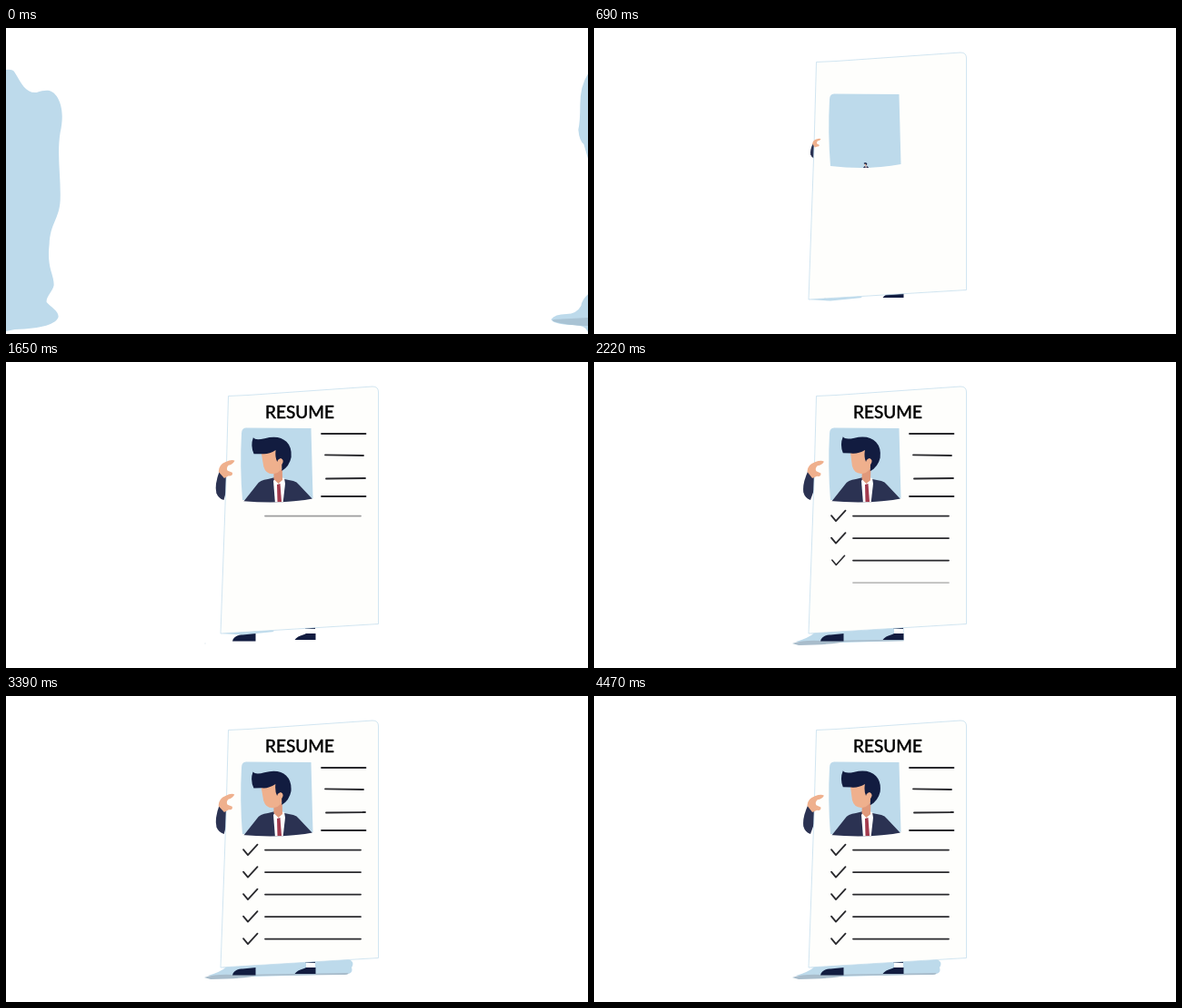
Animation of 640 by 337 pixels, one loop 4500 ms. Source, as an HTML page:

```html
<!DOCTYPE html>
<html lang="en">
<head>
<meta charset="utf-8">
<title>Resume</title>
<style>
  html, body { margin: 0; width: 100%; height: 100%; overflow: hidden; background: #fff; }
  svg { display: block; width: 100%; height: 100%; }
  text { font: 19px Lato, sans-serif; text-anchor: middle; stroke: #000; stroke-width: .5; stroke-linejoin: round; }
  .blue { fill: #bddaeb; }
  .suit { fill: #2b3252; }
  .dark { fill: #121c40; }
  .skin { fill: #efb08d; }
  .ink { fill: none; stroke: #29292d; stroke-width: 1.8; stroke-linecap: round; stroke-linejoin: round; }
</style>
</head>
<body>
<svg viewBox="0 0 640 337">
  <defs>
    <clipPath id="reveal"><rect id="revealBox" x="217" y="285" height="30"/></clipPath>
    <clipPath id="frame"><path d="M258 60H340V150Q305 157 258 153Z"/></clipPath>
  </defs>

  <path id="blobLeft" class="blue" d="M0 46Q8 45 10 49C18 62 22 72 34 71C44 68 50 67 56 75C62 84 64 97 60 115C56 140 61 165 60 190C59 210 49 215 48 238C45 265 53 270 53 283C52 290 44 296 45 302C50 308 58 311 58 318C56 326 40 331 10 332L0 334Z"/>
  <g id="blobRight" class="blue">
    <path d="M640 50Q631 63 631 85Q631 103 629 112Q630 124 635 128L640 145ZM640 293Q633 299 632 306Q627 315 616 315Q603 315 599 321Q602 326 620 327Q638 326 640 336Z"/>
    <path fill="#a9c3d4" d="M601 321L640 319V328Q618 328 601 323Z"/>
  </g>

  <g clip-path="url(#reveal)">
    <path class="blue" d="M222 308Q236 304 243 298L300 290H377Q384 293 380 299Q382 305 376 306L275 309Z"/>
    <path fill="#a8bccb" d="M218 310Q230 306 250 307L376 305Q378 307 370 307L275 308Q268 311 225 312Z"/>
  </g>

  <g id="legs">
    <path class="dark" d="M249 307.500Q250 302 259 300L262 290H274.500V307.500Z"/>
    <path fill="#fff" d="M330 285H340V300H330Z"/>
    <path class="dark" d="M317.500 306Q320 302 328 300L330 299H340.500V306ZM329 286H340V294H329Z"/>
  </g>
  <g id="arm"><path class="suit" d="M235 120Q229 135 231 144Q233 150 239 152L247 126Z"/></g>

  <g id="paper">
    <path class="blue" d="M236 299L260 300.500L295 297L290 294Z"/>
    <path fill="#fefefc" stroke="#bddaeb" stroke-width=".7" d="M244.500 37.500L266 36.500L403 27Q409.500 27 409.500 33V288.500L236 299L242 130Z"/>
    <path class="blue" d="M259 79Q259 72.500 264 72.500L335.500 73L337.500 150Q300 157 260 152Q257 115 259 79Z"/>
  </g>

  <g id="hand"><path class="skin" d="M234 121Q234 113 242 110Q249 107 252 109Q250 113 245 114Q242 117 244 120L249 122Q250 126 245 125.500L240 128Z"/></g>

  <g id="person" clip-path="url(#frame)">
    <path class="suit" d="M261 154L276 135Q279 130 288 129L296 127L316 131Q320 132 322 135L338 152V158H261Z"/>
    <path fill="#fff" d="M294 131L297 126L306 128L307 134L304.500 156H296Z"/>
    <path fill="#a33a4d" d="M298 135L301.500 134L303 154H298.500Z"/>
    <g id="head">
      <path fill="#e0997b" d="M294.500 118H304V130L299.500 134L294.500 129Z"/>
      <path class="skin" d="M281 99L283.500 115Q286 124 295 123Q304 121 305 112L307 103L295 92Z"/>
      <path class="dark" d="M272.500 83Q275 86.500 285 84Q301 80 309 88Q315 94 314 105Q312 115 303.500 120V113Q307 108 302.500 106Q299 107 298.500 110Q296 105 297 97Q289 102 282 101H273Q269 92 272.500 83Z"/>
    </g>
  </g>

  <text id="title" x="323" y="61.500">RESUME</text>
  <g id="notes"></g>
  <g id="rows"></g>
</svg>
<script>
const LOOP = 4500;
const $ = id => document.getElementById(id);
const clamp = v => Math.max(0, Math.min(1, v));
const progress = (t, start, length) => clamp((t - start) / length);
const easeOut = p => 1 - (1 - p) ** 2;

function addInk(parent, d) {
  const path = document.createElementNS("http://www.w3.org/2000/svg", "path");
  path.setAttribute("class", "ink");
  path.setAttribute("d", d);
  return $(parent).appendChild(path);
}

const set = (el, transform) => el.setAttribute("transform", transform);
const scaleAt = (x, y, s) => `translate(${x} ${y}) scale(${s}) translate(${-x} ${-y})`;

const notes = ["M347 79H395.500", "M351 102.300L393 103", "M352 128.500L395 128", "M347 148H395.500"]
  .map(d => addInk("notes", d));
const rows = Array.from({ length: 5 }, (_, i) => {
  const y = 169.600 + i * 24.500;
  return { y, line: addInk("rows", `M285 ${y}H390`), check: addInk("rows", `M261 ${y - 0.5}l5 6l10.500 -11.500`) };
});

function draw(t) {
  const out = progress(t, 0, 200) * 70;
  set($("blobLeft"), `translate(${-out} 0)`);
  set($("blobRight"), `translate(${out} 0)`);

  const pop = (id, x, y, start, extra = "") =>
    set($(id), scaleAt(x, y, easeOut(progress(t, start, 510))) + extra);
  const sway = Math.cos((t - 2160) / 750 * 2 * Math.PI);
  const lean = (x, y, angle) => ` rotate(${sway * angle} ${x} ${y})`;

  pop("paper", 311, 305, 30);
  pop("person", 299, 154, 670);
  pop("title", 323, 54.5, 790);
  pop("arm", 246, 135, 540, lean(238, 130, 3));
  pop("hand", 246, 135, 540, lean(238, 130, 3));
  set($("head"), lean(299, 130, 1.8));

  const step = easeOut(progress(t, 540, 510));
  $("legs").style.visibility = step ? "visible" : "hidden";
  set($("legs"), `translate(0 ${-18 * (1 - step)})`);
  $("revealBox").setAttribute("width", 168 * progress(t, 1640, 790));

  notes.forEach((note, i) => note.setAttribute("opacity", progress(t, 1150 + i * 100, 200)));
  rows.forEach(({ y, line, check }, i) => {
    line.setAttribute("opacity", progress(t, 1560 + i * 200, 200));
    const s = easeOut(progress(t, 1690 + i * 200, 200));
    check.style.visibility = s ? "visible" : "hidden";
    set(check, scaleAt(268.5, y, s));
  });
}

function tick() {
  draw(performance.now() % LOOP);
  requestAnimationFrame(tick);
}
tick();
</script>
</body>
</html>
```
